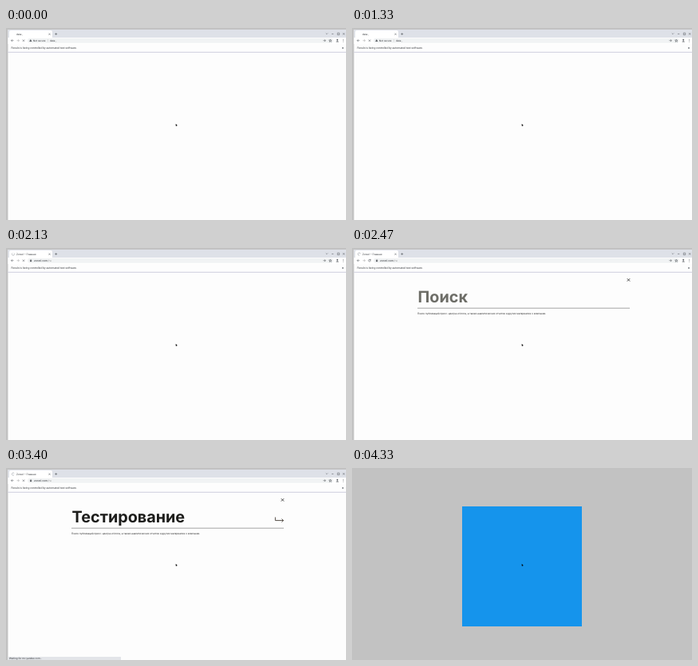
Animation of 426x240 px, one loop 4.39 s. Source, as an HTML page:

```html
<!DOCTYPE html>
<html lang="ru">
<head>
<meta charset="utf-8">
<title>Browser test</title>
<style>
html, body { margin: 0; width: 100%; height: 100%; overflow: hidden; background: #c2c2c2; }
svg { display: block; width: 100vw; height: 100vh; }
text { font: 3.45px Inter, "Open Sans", sans-serif; fill: #222; text-rendering: geometricPrecision; white-space: pre; }
.ui text { font-family: Roboto, "Open Sans", sans-serif; font-size: 3.2px; fill: #35383c; }
.ui .dim { fill: #888; }
.icon { fill: none; stroke: #5f6368; stroke-width: .6; }
.rule { stroke: #808080; stroke-width: .7; }
text.big { font-size: 19.8px; font-weight: 700; fill: #1d1d1b; }
text.hint { fill: #6d6d67; }
text.note { font-size: 3.04px; }
text.head { font-size: 4.32px; font-weight: 700; fill: #111; }
text.strong { font-weight: 600; }
text.green { fill: #16a62d; }
text.white { fill: #fff; }
text.mark { font-size: 3.3px; fill: #c9f3ce; }
</style>
</head>
<body>
<svg viewBox="0 0 426 240">
  <rect width="426" height="240" fill="#c2c2c2"/>
  <rect x="138" y="48" width="150" height="150" fill="#1594ec"/>

  <g data-t="0 4330">
    <g class="ui">
      <rect x="2.5" y="2" width="424" height="238" fill="#fdfdfd"/>
      <rect x="2.5" y="2" width="424" height="10" fill="#dee1e8"/>
      <path d="M4 12V5q0-2 2-2H56q2 0 2 2v7z" fill="#fff"/>
      <rect x="2.5" y="12" width="424" height="8" fill="#fff"/>
      <rect x="27" y="12.7" width="383" height="6" rx="3" fill="#f1f3f4"/>
      <path d="M2.5 30.3H426" stroke="#c5c5d6" stroke-width=".8"/>
      <g class="icon">
        <path d="M53.5 6.7l2 2m0-2l-2 2M61.2 7.5h3m-1.5-1.5v3"/>
        <path d="M400.8 6.5l1.2 1.2 1.2-1.2M408 7.4h2.4M415.3 6.2h2.4v2.4h-2.4zM422 6.2l2.4 2.4m0-2.4l-2.4 2.4"/>
        <path d="M9.5 15.7H6.5l1.4-1.4m-1.4 1.4l1.4 1.4"/>
        <path d="M13.5 15.7h3l-1.4-1.4m1.4 1.4l-1.4 1.4" stroke="#aaa"/>
        <path d="M397.4 15.7h3l-1.5-1.4m1.5 1.4l-1.5 1.4M406.3 14.1l.5 1.2h1.2l-1 .8.4 1.3-1.1-.8-1.1.8.4-1.3-1-.8h1.2z"/>
        <path d="M421 24l2 2m0-2l-2 2"/>
      </g>
      <circle cx="415.2" cy="14.8" r="1" fill="#5f6368"/>
      <path d="M413.4 17.5q1.8-2.5 3.6 0z" fill="#5f6368"/>
      <path d="M422.5 14v.7m0 .7v.7m0 .7v.7" stroke="#5f6368" stroke-width=".7"/>
      <text x="6.5" y="26.2" style="font-size:3.42px">Fenulo is being controlled by automated test software.</text>

      <g data-t="0 1400">
        <text x="13" y="8.7">data:,</text>
        <path d="M30.8 14l1.7 3h-3.4z" fill="#5f6368"/>
        <text x="34" y="16.9">Not secure</text>
        <path d="M52.5 14v3.4" stroke="#bbb" stroke-width=".4"/>
        <text x="55" y="16.9">data:,</text>
      </g>
      <g data-t="1400 4330">
        <rect x="30" y="15.3" width="2.2" height="1.8" fill="#5f6368"/>
        <path class="icon" d="M30.4 15.5v-.6q.7-1 1.4 0v.6"/>
        <text x="35" y="16.9" style="font-size:3.5px">zorvel.com<tspan class="dim">/ru<tspan data-t="3670 4330">/search?search=Тестирование</tspan></tspan></text>
      </g>
      <text data-t="1400 3670" x="13" y="8.7">Zorvel – Главная</text>
      <text data-t="3670 4330" x="13" y="8.7">Поиск</text>
      <path class="icon" data-t="0 2200 3000 3670" d="M20.8 14.5l2.4 2.4m0-2.4l-2.4 2.4"/>
      <path class="icon" data-t="2200 3000 3670 4330" d="M23.1 14.8a1.4 1.4 0 1 0 .2 1.4M23.4 13.9v1.4H22"/>
      <path id="spin" class="icon" data-t="1400 3670" style="stroke:#a0a4aa" d="M0-1.6A1.6 1.6 0 1 1-1.6 0"/>
      <rect data-t="3670 4330" x="7.2" y="5.6" width="3.8" height="3.8" fill="#1fb03a"/>
    </g>

    <g id="search" data-t="2200 4330">
      <path d="M344.8 38.2l3.4 3.4m0-3.4l-3.4 3.4" stroke="#222" stroke-width=".8"/>
      <text id="query" class="big" x="82.6" y="68.3"></text>
      <path class="rule" d="M82 75.2H348"/>
      <path data-t="2730 4330" d="M337.4 61.5v4.1h10.2m-2.1-2l2.1 2-2.1 2" fill="none" stroke="#443d35" stroke-width=".9"/>
      <text class="note" x="82" y="82.5">Поиск публикаций пресс-центра и блога, а также аналитических отчетов и других материалов о компании.</text>
    </g>

    <g data-t="3670 4330">
      <path class="rule" d="M80 159.2H254M80 216.2H254M286.5 119.5H346.5"/>
      <g id="marks" fill="#12ad32"></g>
      <text class="head green" x="80.3" y="123.5">5 шагов к повышению эффективности работы сотрудников call-центра</text>
      <text x="80.3" y="133.7">… если они не согласны с результатами оценки. 5. Обучение и</text>
      <text x="215.5" y="133.7">Важным этапом в</text>
      <text x="80.3" y="139.5">организации работы call-центра …</text>
      <text class="note green" x="80.3" y="149">Блог</text>

      <text class="head" x="80.3" y="171.8">Zorvel и КЕЛ НОРТ подтвердили совместимость продуктов для телеком-</text>
      <text class="head" x="80.3" y="178">операторов</text>
      <text x="80.3" y="188.2">… с российской операционной системой КЕЛ ОС. Успешно прошло</text>
      <text x="224" y="188.2">комплекс</text>
      <text x="80.3" y="194">продуктов для монетизации сетей … инфраструктуру и поддерживаясь у наших клиентов.</text>
      <text x="80.3" y="199.8">Успешное</text>
      <text x="125.5" y="199.8">на совместимость с российской операционной …</text>
      <text class="note" x="80.3" y="208.5" style="fill:#999">Новость</text>
      <text class="head" x="80.3" y="232">Вид деятельности</text>

      <text class="strong" x="286.5" y="129">Не нашли что искали?</text>
      <text class="strong green" x="286.5" y="138.8">Свяжитесь с нами  →</text>
      <rect x="365.5" y="220.8" width="47" height="11.4" rx="5.7" fill="#0fab2d"/>
      <text class="strong white" x="389" y="227.6" text-anchor="middle">СВЯЗАТЬСЯ С НАМИ</text>
      <rect x="422.7" y="31" width="3.3" height="209" fill="#f1f1f1"/>
      <rect x="423.2" y="33" width="2.3" height="86" fill="#c1c1c1"/>
    </g>

    <g class="ui" data-t="3130 4330">
      <rect x="2.5" y="236" width="141.5" height="4" fill="#e3e5e9"/>
      <text data-t="3130 3670" x="4" y="239.2">Waiting for mc.yandex.com…</text>
      <text data-t="3670 4330" x="4" y="239.2">https://zorvel.com/ru/blog/hr-management-system</text>
    </g>
  </g>

  <path d="M212.7 119.8v2.7l.6-.5.5 1 .5-.3-.4-.9h.9z" fill="#000"/>
</svg>
<script>
const LOOP = 4390, WORD = "Тестирование";
const $ = id => document.getElementById(id);

// Highlighted matches in the result list
$("marks").innerHTML = [[188.7, 129.8], [197, 184.3], [98, 195.9], [190, 238.3]].map(([x, y]) =>
  `<rect x="${x}" y="${y}" width="25.5" height="5.4"/>
   <text class="mark" x="${x + 1}" y="${y + 3.9}">тестирование</text>`).join("");

// Each data-t holds pairs of start and end times
const timed = [...document.querySelectorAll("[data-t]")].map(el => ({ el, t: el.dataset.t.split(" ").map(Number) }));

function draw(now) {
  const t = now % LOOP;
  for (const { el, t: span } of timed) {
    const on = span.some((s, i) => i % 2 === 0 && t >= s && t < span[i + 1]);
    el.style.display = on ? "" : "none";
  }
  const typed = Math.max(0, Math.min(WORD.length, Math.ceil((t - 2730) / 14)));
  $("query").textContent = WORD.slice(0, typed) || "Поиск";
  $("query").classList.toggle("hint", !typed);
  $("search").setAttribute("transform", `translate(${t < 3670 ? 0 : -1.6})`);
  $("spin").setAttribute("transform", `translate(9 7.6) rotate(${t * .36})`);
  requestAnimationFrame(() => draw(performance.now() - start));
}
const start = performance.now();
draw(0);
</script>
</body>
</html>
```
